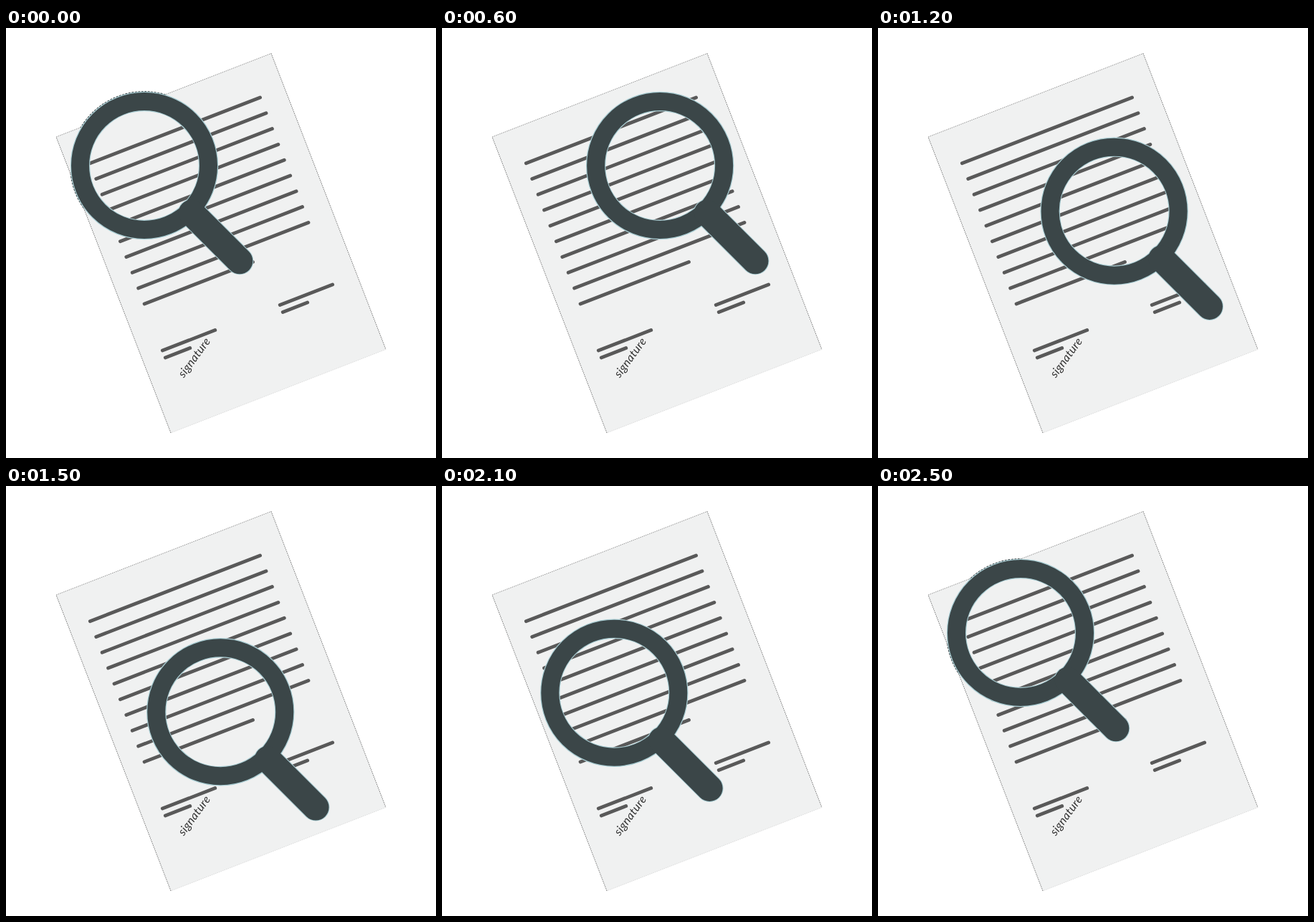
Write an HTML page that moves like this. It is 600x600 px and loops after 2.6 s.

```html
<!DOCTYPE html>
<html lang="en">
<head>
<meta charset="utf-8">
<title>Document search</title>
<style>
  html, body { margin: 0; width: 100%; height: 100%; overflow: hidden; background: #fff; }
  svg { display: block; width: 100%; height: 100%; }
  .ink { fill: none; stroke: #595959; stroke-width: 4.8; stroke-linecap: round; }
  .edge { fill: none; stroke: #444; stroke-width: .8; stroke-dasharray: 1.4 1.3; }
  .halo { fill: none; stroke: #a9cdd3; }
  .body { fill: none; stroke: #3b4648; }
  .rough { fill: none; stroke: #2c3335; stroke-width: 1.5; stroke-dasharray: 3 1.5; }
  .bar { stroke-linecap: round; }
  text { font: italic 16px Lato, "Open Sans", sans-serif; letter-spacing: .3px; fill: #333; }
</style>
</head>
<body>
<svg viewBox="0 0 600 600">
  <!-- rough outline, hidden wherever the paper covers it -->
  <g class="glass">
    <circle class="rough" r="103.2"/>
    <circle class="rough" r="75.8"/>
    <path class="rough" d="M86 59L146.5 119.5A19.3 19.3 0 0 1 119.5 146.5L59 86"/>
  </g>
  <path fill="#f0f1f1" d="M370 35.5L530 448.5L230 565L70 152Z"/>
  <path class="edge" d="M370 35.5L530 448.5M230 565L70 152"/>
  <path class="edge" opacity=".75" d="M70 152L370 35.5"/>
  <path class="edge" opacity=".2" d="M530 448.5L230 565"/>
  <path class="ink" id="lines"/>
  <text text-anchor="middle" transform="translate(267 463) rotate(-53.5)">signature</text>
  <g class="glass">
    <circle class="halo" r="89.5" stroke-width="27.4"/>
    <path class="halo bar" d="M66 66L133 133" stroke-width="38.6"/>
    <circle class="body" r="89.5" stroke-width="25"/>
    <path class="body bar" d="M66 66L133 133" stroke-width="36.6"/>
  </g>
</svg>
<script>
const LOOP = 2600, STEP = 100;

// time, x, y of the lens centre
const path = [
  [0, 193, 192], [100, 207, 192], [800, 343, 192], [900, 360, 196],
  [1700, 279, 355], [1800, 270, 349], [2100, 240.3, 288.7],
  [2500, 199, 205], [LOOP, 193, 192]
];

const line = (x, y, dx, dy) => `M${x} ${y}l${dx} ${dy}`;
let d = '';
for (let i = 0; i < 10; i++) {
  const k = i < 9 ? 1 : .638;
  d += line(117.3 + 8.42 * i, 188.7 + 21.8 * i, 237.3 * k, -91.7 * k);
}
for (const [x, y] of [[218.3, 450], [382.2, 386.4]]) {
  d += line(x, y, 73.5, -28.4) + line(x + 4, y + 10, 34.5, -13.4);
}
document.getElementById('lines').setAttribute('d', d);

function position(t) {
  const i = path.findIndex(p => p[0] > t);
  const [t0, x0, y0] = path[i - 1], [t1, x1, y1] = path[i];
  const k = (t - t0) / (t1 - t0);
  return [x0 + (x1 - x0) * k, y0 + (y1 - y0) * k];
}

const layers = document.querySelectorAll('.glass');
const start = performance.now();

function draw(now) {
  const t = Math.max(0, now - start) % LOOP;
  const [x, y] = position(Math.floor(t / STEP) * STEP);
  for (const g of layers) g.setAttribute('transform', `translate(${x} ${y})`);
  requestAnimationFrame(draw);
}
draw(start);
</script>
</body>
</html>
```
